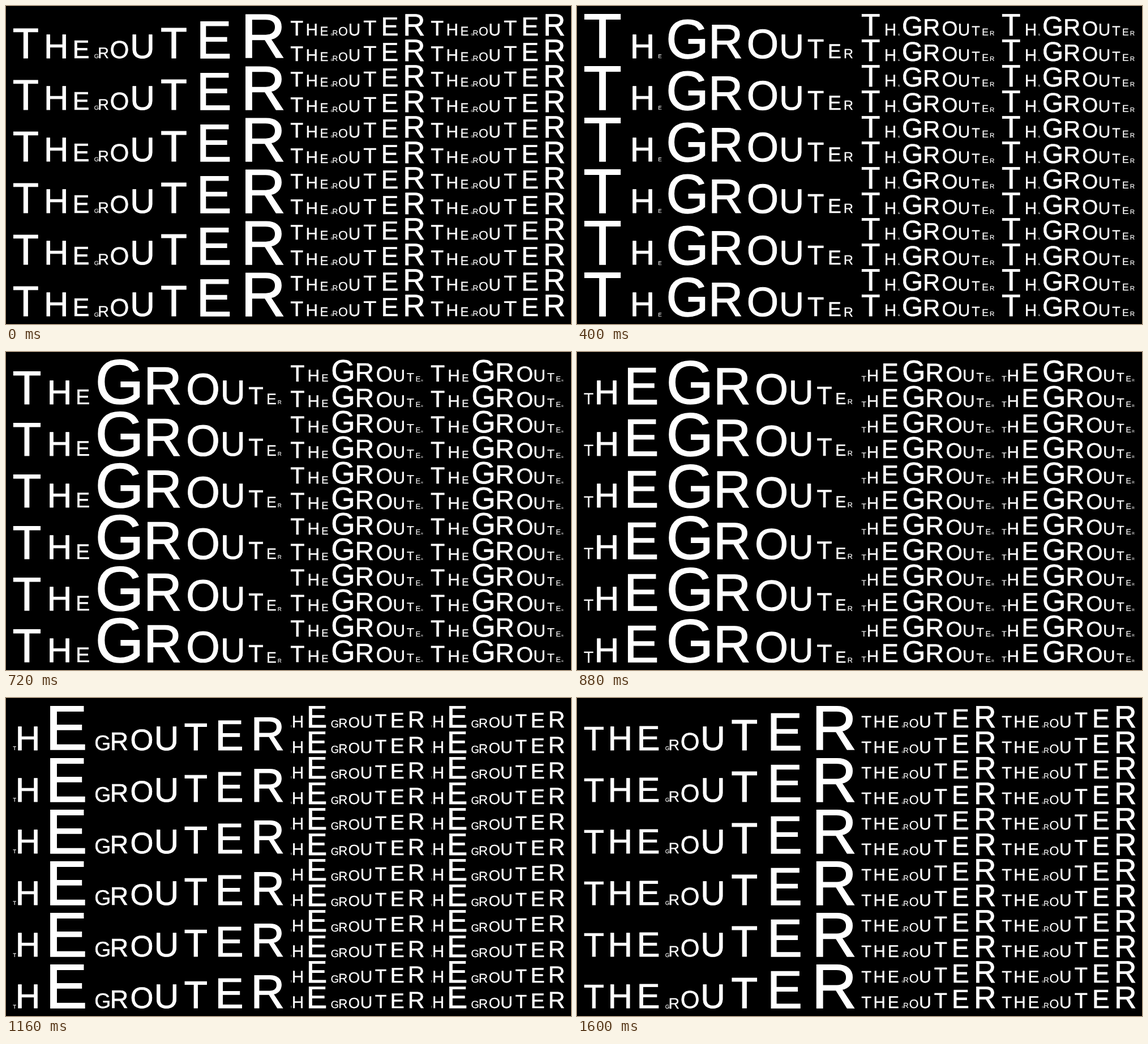
Animation of 998 by 561 pixels, one loop 1640 ms. Source, as an HTML page:

```html
<!DOCTYPE html>
<html lang="en">
<head>
<meta charset="utf-8">
<title>Type wave</title>
<style>
  html, body { margin: 0; width: 100%; height: 100%; overflow: hidden; background: #000; }
  svg { display: block; width: 100vw; height: 100vh; }
  text {
    font: 100px "Liberation Sans", Arial, sans-serif;
    fill: #fff;
    stroke: #fff;
    stroke-width: 1.4px;
    text-anchor: middle;
    text-rendering: geometricPrecision;
  }
</style>
</head>
<body>
<svg viewBox="0 0 998 561">
  <defs><g id="line"></g></defs>
  <g id="wall"></g>
</svg>
<script>
const NS = 'http://www.w3.org/2000/svg';
const LOOP = 1640, STEP = 40;
const MID = 42.3, AMP = 35.5; // cap height: mean and swing
const CAP = 70.2;             // cap height at font-size 100, with stroke
const INK = { E: -2, R: -2, G: 1 }; // centres the ink of lopsided glyphs

// at: [centre when all letters are equal, travel per unit of swing]
const words = [
  { text: 'THE', cross: -38, at: [[30.2, 15], [77, 38.5], [127.7, 18.9]] },
  { text: 'GROUTER', cross: 278, at: [[179.5, 20], [225.3, 53.6], [273.7, 74.4],
    [320.2, 80.5], [368.4, 73], [418.9, 50.4], [470, 13.5]] }
];

function add(parent, tag, attrs) {
  const el = document.createElementNS(NS, tag);
  for (const key in attrs) el.setAttribute(key, attrs[key]);
  parent.appendChild(el);
  return el;
}

const line = document.getElementById('line');
const wall = document.getElementById('wall');

for (const word of words) {
  word.glyphs = [...word.text].map(ch => {
    const el = add(line, 'text', { x: INK[ch] || 0, y: -0.7 });
    el.textContent = ch;
    return el;
  });
}

function column(x, y, scale, rows, pitch) {
  for (let i = 0; i < rows; i++) {
    add(wall, 'use', {
      href: '#line',
      transform: `translate(${x} ${y + i * pitch}) scale(${scale})`
    });
  }
}
column(0, 92.2, 1, 6, 91.1);
column(496.5, 52.2, 0.4935, 12, 45);
column(744.4, 52.2, 0.4935, 12, 45);

// Eased swing between -1 and 1, rising through 0 at t = 0
function swing(t) {
  const half = LOOP / 2, quarter = LOOP / 4;
  const p = (((t + quarter) % LOOP) + LOOP) % LOOP;
  const sign = p < half ? 1 : -1;
  const d = (p % half - quarter) / quarter;
  return sign * Math.sign(d) * (1 - Math.pow(1 - Math.abs(d), 3.7));
}

function draw(t) {
  for (const { glyphs, cross, at } of words) {
    const v = swing(t - cross);
    glyphs.forEach((el, i) => {
      const tilt = 1 - 2 * i / (glyphs.length - 1);
      const x = at[i][0] + at[i][1] * v;
      const size = (MID + AMP * tilt * v) / CAP;
      el.setAttribute('transform', `translate(${x.toFixed(3)} 0) scale(${size.toFixed(4)})`);
    });
  }
}

let start = null;
function tick(now) {
  if (start === null) start = now;
  const t = Math.max(0, now - start) % LOOP;
  draw(Math.floor(t / STEP) * STEP);
  requestAnimationFrame(tick);
}
draw(0);
requestAnimationFrame(tick);
</script>
</body>
</html>
```
